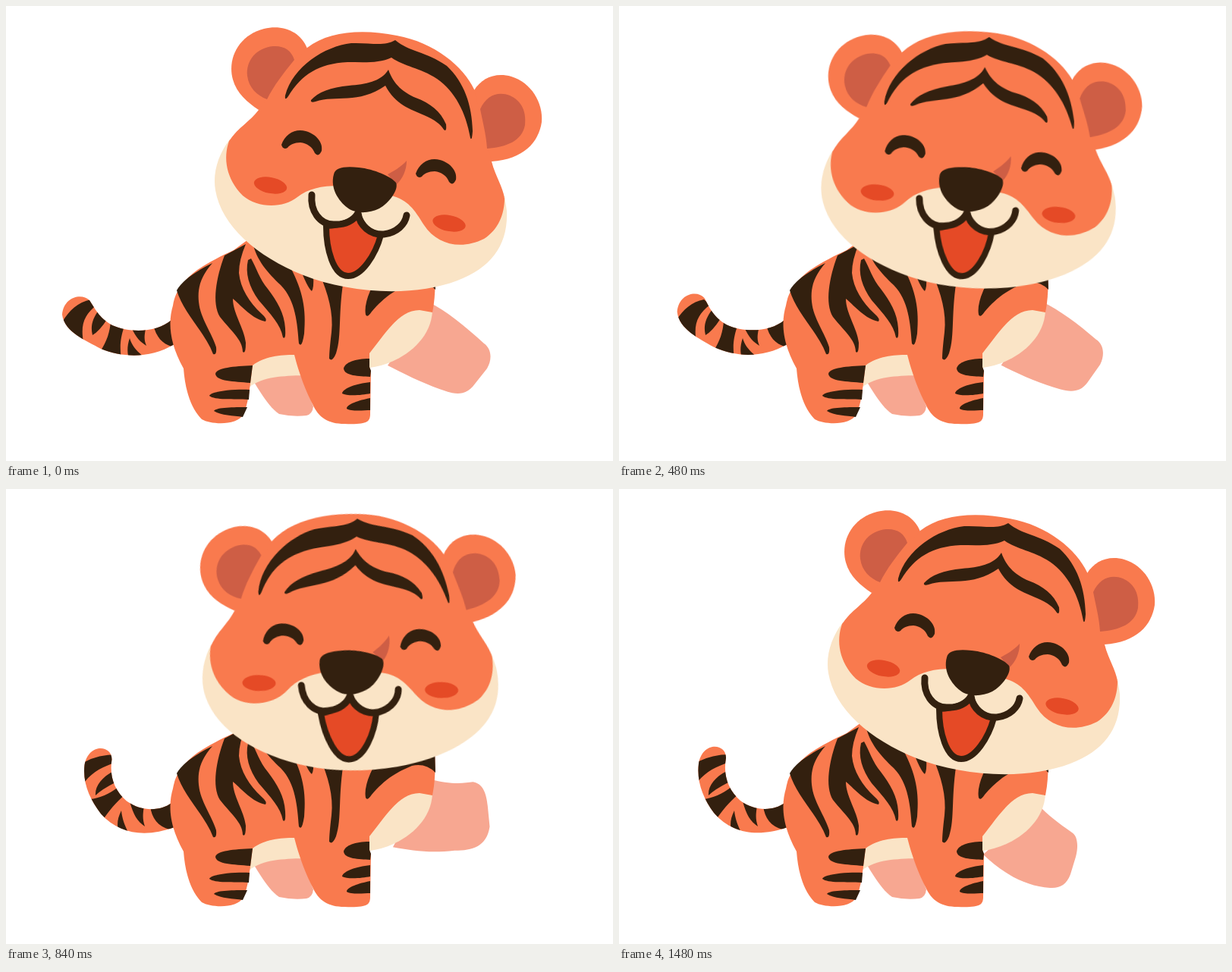
Recreate the animation shown at these times as an HTML page without scripts. Size 800 by 600 pixels, loop 2 s.

```html
<!DOCTYPE html>
<html lang="en">
<head>
<meta charset="utf-8">
<title>Happy tiger</title>
<style>
  html, body { margin: 0; width: 100%; height: 100%; overflow: hidden; background: #fff; }
  svg { display: block; width: 100%; height: 100%; }
  .orange { fill: #f97a4e; }
  .dark { fill: #33200f; }
  .cream { fill: #fae4c6; }
  .pink { fill: #f7a791; }
  .rust { fill: #ce5e45; }
  .red { fill: #e54a26; }
  .line { fill: none; stroke: #33200f; stroke-width: 9; stroke-linecap: round; stroke-linejoin: round; }
  .mouth { fill: #e54a26; stroke-width: 8; }
  .head, .tail, .rings, .paw { animation: 2s cubic-bezier(.333, 0, .667, 1) infinite; }
  .head { animation-name: nod; transform-origin: 454px 334px; }
  .tail { animation-name: wag; }
  .rings { animation-name: wag-rings; }
  .paw { animation-name: wave; }

  @keyframes nod {
    0%, 30.25%, 58.5%, 100% { transform: rotate(0deg); }
    16.5%, 46% { transform: rotate(-11.6deg); }
  }
  @keyframes wag {
    0%, 26.25%, 52% { d: path("M218 414C200 430 165 432 140 421C122 411 117 398 110 388C100 378 76 383 74 407C77 430 105 441 125 452C155 464 190 465 222 446Z"); }
    14%, 40.5%, 69%, 100% { d: path("M218 414C205 424 180 426 160 411C144 397 137 378 141 355C142 335 110 332 105 362C102 386 111 408 125 427C150 456 185 459 222 446Z"); }
  }
  @keyframes wag-rings {
    0%, 26.25%, 52% { d: path("M70 424C80 405 92 391 112 387L120 394C103 407 98 420 102 443L80 438ZM123 400C114 412 111 422 114 434Q123 429 134 412ZM138 415L156 422C150 440 150 450 152 466L124 456C133 442 137 430 138 415ZM163 438C159 450 160 458 162 466L186 466C174 457 166 449 163 438ZM165 424C172 438 177 443 185 448C182 441 182 436 184 426ZM194 420C198 437 206 445 218 449L224 450L224 420L214 410Z"); }
    14%, 40.5%, 69%, 100% { d: path("M98 363Q119 350 146 350L146 360C128 366 115 372 104 386L98 380ZM142 372C126 380 117 392 118 404Q126 396 146 386ZM148 393C136 402 124 408 110 409L128 436C136 424 145 413 157 403ZM152 424C147 434 146 441 148 452L164 458C156 444 153 434 152 424ZM163 412C168 430 173 438 183 445C180 436 180 430 182 418ZM190 418C192 434 200 445 216 449L224 450L224 420L214 410Z"); }
  }
  @keyframes wave {
    0%, 26.25% { d: path("M558 391C580 402 605 422 630 445C640 452 641 466 634 478L615 502C606 512 595 513 580 508C555 500 530 488 503 474Z"); }
    14%, 40.5% { d: path("M558 381C586 389 605 386 616 384C629 386 634 398 636 416L639 443C635 470 616 475 592 475C561 479 536 476 511 472Z"); }
    54.5%, 100% { d: path("M552 416C565 430 580 441 597 453C604 457 606 470 602 485L595 508C590 522 580 527 568 526C535 524 505 506 480 482Z"); }
  }
</style>
</head>
<body>
<svg viewBox="0 0 800 600">
  <clipPath id="tail-shape"><path class="tail"/></clipPath>
  <path class="tail orange"/>
  <g clip-path="url(#tail-shape)"><path class="rings dark"/></g>
  <path class="paw pink"/>

  <!-- body -->
  <path class="pink" d="M327 496L345 486H388L405 528Q404 538 396 540Q378 542 360 538C348 530 338 514 327 496Z"/>
  <path class="cream" d="M320 503C340 488 365 488 392 487L385 450L322 462Z"/>
  <path class="cream" d="M479 477C515 473 560 445 562 402L530 395L475 455Z"/>
  <path class="orange" d="M300 322C262 340 226 358 220 395C214 415 214 442 234 478C236 505 243 530 258 545C270 552 305 554 313 538C320 522 321 505 325 474C340 462 362 460 380 460C385 480 394 506 404 525C412 543 425 551 446 551C475 552 480 549 480 538L481 482L479 476V458C500 432 518 401 545 401L562 404Q567 380 565 345L500 300H330Z"/>
  <g class="dark">
    <path d="M272 339C250 350 232 362 225 375C234 405 262 430 273 459Q278 461 277 450C272 432 256 412 254 390C252 370 258 355 272 339Z"/>
    <path d="M288 329C277 358 271 392 282 410C296 428 312 440 312 456Q316 460 316 444C314 425 299 405 299 386C312 397 325 413 342 416Q345 413 337 406C320 390 309 372 307 352Q307 335 316 314Z"/>
    <path d="M319 335C315 352 320 370 333 388C349 407 362 420 365 437Q369 441 368 425C367 405 357 389 345 373C334 360 330 345 323 333Z"/>
    <path d="M325 312C330 335 345 352 362 368C382 388 384 420 386 445Q390 452 393 432C396 400 391 375 375 345Z"/>
    <path d="M390 352Q398 372 403 376Q406 372 405 355Z"/>
    <path d="M414 355C424 378 432 405 429 430Q426 455 426 465Q430 470 435 458C443 435 437 405 446 355Z"/>
    <path d="M500 340Q470 385 474 407Q476 412 482 403C495 388 508 376 535 365Q553 361 566 374L565 340Z"/>
    <path d="M325 474C300 475 278 477 276 485C277 495 300 495 322 497Z"/>
    <path d="M321 506C300 505 270 508 268 514C275 520 300 518 320 519Z"/>
    <path d="M318 529C300 529 278 529 274 534C283 540 300 540 312 542Z"/>
    <path d="M479 465C460 465 447 470 445 478C446 488 465 488 480 489L481 481L479 476Z"/>
    <path d="M480 496C460 498 443 505 443 511C450 515 470 513 480 511Z"/>
    <path d="M480 517C465 520 449 525 449 531C455 535 472 533 480 533Z"/>
  </g>

  <g class="head">
    <path class="orange" d="M397 56C388 33 364 24 340 30C308 38 291 68 299 97C304 115 318 127 333 137L380 110Z"/>
    <path class="orange" d="M617 111C627 95 645 87 666 93C692 101 708 127 706 153C702 180 682 202 640 205L600 160Z"/>
    <path class="cream" d="M295 176C280 195 272 220 276 243C284 290 330 330 392 355C450 378 535 385 595 362C640 345 662 315 660 270L657 250Z"/>
    <path class="orange" d="M333 137C322 152 306 160 294 178C286 200 290 228 312 250C332 267 365 267 384 252C398 241 415 237 440 237L508 250C530 256 538 268 551 289C568 315 600 322 630 307C649 295 657 274 657 254C655 238 645 225 640 205L617 110C603 80 565 48 515 39C470 30 425 33 397 55Z"/>
    <g class="rust">
      <path d="M380 71C376 58 366 52 352 53C330 55 316 72 318 92C320 108 331 118 344 123C353 105 366 88 380 71Z"/>
      <path d="M625 136C633 118 648 112 664 118C680 125 686 140 684 157C680 178 660 186 634 188C633 170 628 152 625 136Z"/>
      <path d="M528 204C520 213 510 218 503 222L514 236C523 228 528 216 528 204Z"/>
    </g>
    <g class="dark">
      <path d="M513 45C498 54 480 48 455 49C420 53 378 80 368 118Q367 126 372 119C390 90 412 76 450 74C470 74 492 76 508 68C525 80 545 81 568 96C592 113 606 140 612 174Q614 179 615 165C614 130 604 101 581 79C552 59 532 61 513 45Z"/>
      <path d="M504 84C494 100 474 103 452 105C428 107 411 114 402 124Q401 128 408 126C435 117 464 130 500 105C513 130 533 136 551 144C565 150 573 156 577 163Q581 167 580 156C573 139 559 128 540 121C524 114 511 104 504 84Z"/>
      <path id="eye" d="M363 183C368 168 382 161 395 165C409 169 418 180 416 191Q412 200 407 194C404 186 397 181 388 180C380 180 374 183 371 187Q365 190 363 183Z"/>
      <use href="#eye" x="177" y="38"/>
    </g>
    <g class="red">
      <ellipse id="cheek" cx="348.5" cy="236.5" rx="22" ry="10.5" transform="rotate(11 348.5 236.5)"/>
      <use href="#cheek" x="235.5" y="50"/>
    </g>
    <path class="line mouth" d="M422 290C422 320 431 356 451 356C469 356 487 328 494 302Q472 298 464 275Q452 289 422 290Z"/>
    <path class="line" d="M403 249C401 270 413 288 432 288C448 289 459 282 464 273C466 290 480 302 498 301C515 299 526 288 528 276"/>
    <path class="dark" d="M432 222C434 213 446 211 465 213C485 215 508 225 514 233C518 242 505 260 492 267C478 274 460 274 450 266C438 257 427 240 432 222Z"/>
  </g>
</svg>
</body>
</html>
```
